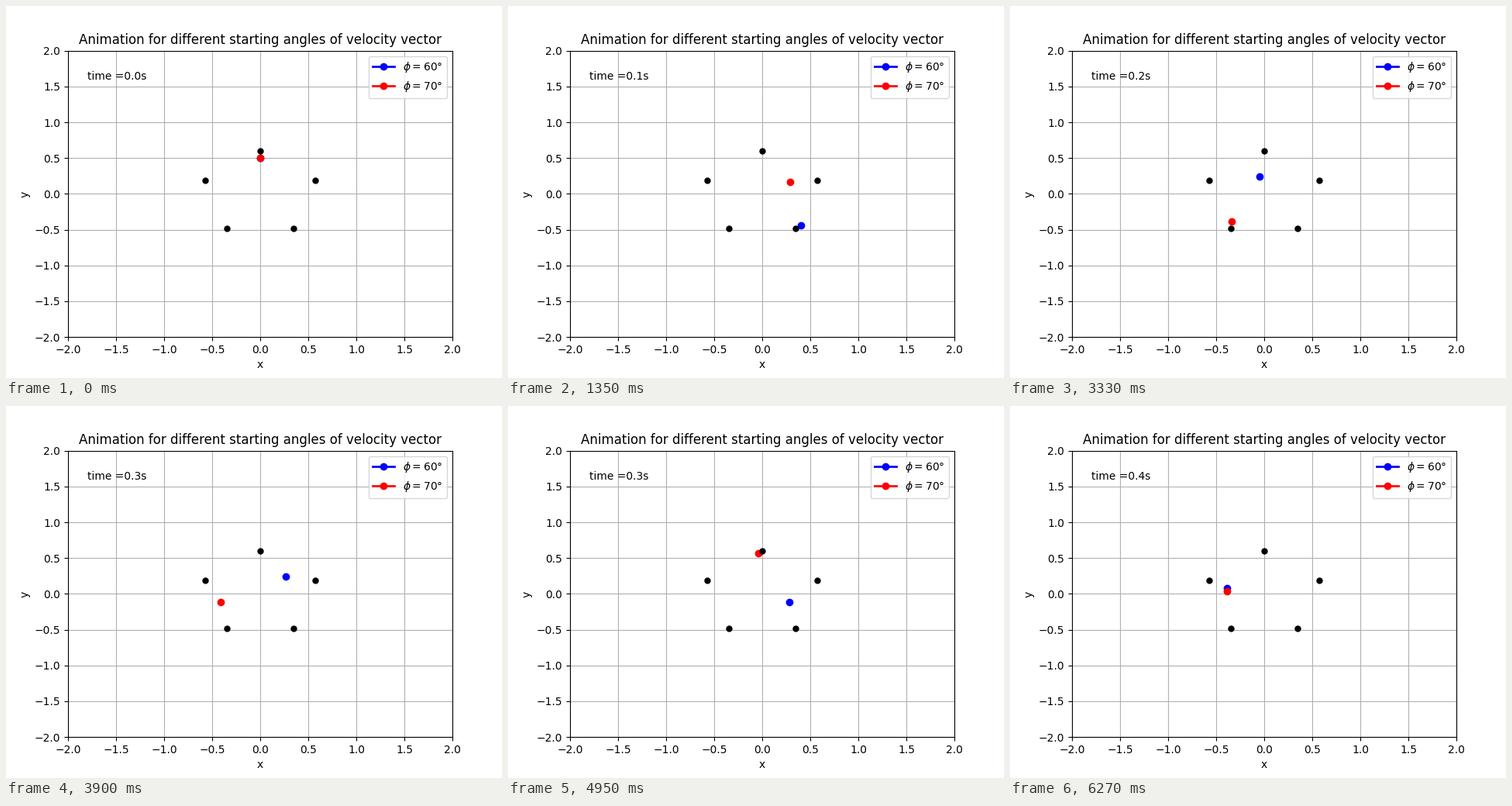
Write a matplotlib script that moves like this. It is 640 px wide and 480 px high and loops after 6.3 s.

```python
import numpy as np
import matplotlib.pyplot as plt
from matplotlib.animation import FuncAnimation

FRAMES, INTERVAL, DT = 210, 30, 0.002
REACH = 0.95  # how close a particle comes to a charge when it turns there

TOP, LEFT, LOW_LEFT, LOW_RIGHT, RIGHT = CHARGES = np.array(
    [(0, .6), (-.57, .185), (-.35, -.485), (.35, -.485), (.57, .185)])

# Positions at the key steps, and the charges visited on each leg between them
STEPS = [0, 45, 78, 111, 130, 165, 209]
BLUE = [(0, .5), (.405, -.44), (.371, .035), (-.047, .243),
        (.268, .243), (.283, -.115), (-.384, .078)]
BLUE_TURNS = [[RIGHT], [LOW_RIGHT], [RIGHT, TOP], [RIGHT],
              [LOW_RIGHT], [RIGHT, TOP]]
RED = [(0, .5), (.292, .165), (-.483, .057), (-.338, -.387),
       (-.411, -.117), (-.04, .566), (-.384, .032)]
RED_TURNS = [[TOP], [RIGHT], [LOW_LEFT], [LEFT], [LEFT], [LOW_LEFT]]


def waypoints(keys, turns):
    """Space the turns evenly in time between the key positions."""
    times, points = [STEPS[0]], [keys[0]]
    for start, end, key, leg in zip(STEPS, STEPS[1:], keys[1:], turns):
        times.extend(np.linspace(start, end, len(leg) + 2)[1:])
        points.extend([REACH * charge for charge in leg] + [key])
    return np.array(times), np.array(points)


def smooth_path(keys, turns):
    """Cubic Hermite curve through the waypoints, sampled at every step."""
    t, p = waypoints(keys, turns)
    slope = np.gradient(p, t, axis=0)
    s = np.arange(FRAMES)
    i = np.clip(np.searchsorted(t, s, side="right") - 1, 0, len(t) - 2)
    h = (t[i + 1] - t[i])[:, None]
    u = (s - t[i])[:, None] / h
    return ((1 + 2 * u) * (1 - u) ** 2 * p[i] + u * (1 - u) ** 2 * h * slope[i]
            + u * u * (3 - 2 * u) * p[i + 1] + u * u * (u - 1) * h * slope[i + 1])


fig, ax = plt.subplots(figsize=(6.4, 4.8), dpi=100)
ax.set(xlim=(-2, 2), ylim=(-2, 2), xlabel="x", ylabel="y",
       title="Animation for different starting angles of velocity vector")
ax.grid()
ax.plot(*CHARGES.T, "ko", ms=5, zorder=3)

paths = [smooth_path(BLUE, BLUE_TURNS), smooth_path(RED, RED_TURNS)]
dots = [ax.plot([], [], "o-", color=color, lw=2, label=rf"$\phi = {angle}$°")[0]
        for color, angle in (("blue", 60), ("red", 70))]
clock = ax.text(-1.8, 1.6, "")
ax.legend(loc="upper right")


def update(step):
    for dot, path in zip(dots, paths):
        dot.set_data(path[step:step + 1, 0], path[step:step + 1, 1])
    clock.set_text(f"time ={step * DT:.1f}s")
    return *dots, clock


anim = FuncAnimation(fig, update, frames=FRAMES, interval=INTERVAL,
                     repeat=True, repeat_delay=0, blit=False)
plt.show()
```
